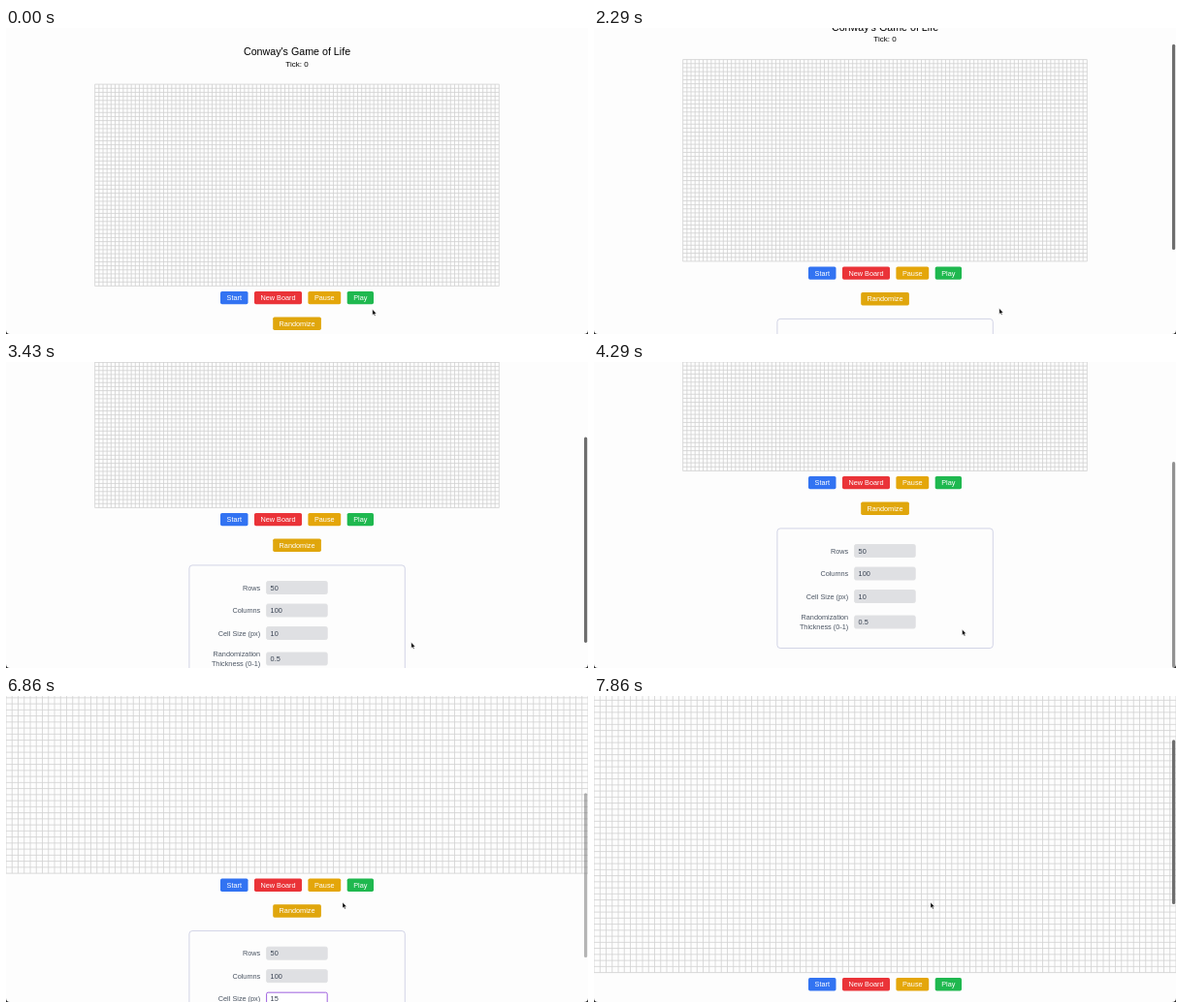
Animation of 600 by 316 pixels, one loop 8000 ms. Source, as an HTML page:

```html
<!DOCTYPE html>
<html lang="en">
<head>
<meta charset="utf-8">
<title>Game of Life board</title>
<style>
  html, body { margin: 0; width: 100%; height: 100%; overflow: hidden; background: #fdfdfd; }
  svg { display: block; width: 600px; height: 316px; }
  text { font: 7.3px "Liberation Sans", Arial, sans-serif; fill: #4b5563; }
  .mid { text-anchor: middle; }
  .end { text-anchor: end; }
  .head { fill: #000; }
  .light { fill: #fff; }
</style>
</head>
<body>
<svg viewBox="0 0 600 316">
  <g id="page">
    <text class="mid head" x="300" y="28" style="font-size:10.7px">Conway's Game of Life</text>
    <text class="mid head" x="300" y="39.7" style="font-size:8px">Tick: 0</text>
    <path id="grid" fill="none" stroke="#d3d3d3" stroke-width=".83"/>
    <g id="controls">
      <rect x="188.9" y="325.9" width="222.4" height="123.6" rx="3.2" fill="none" stroke="#cdd0e4" stroke-width=".9"/>
    </g>
  </g>
  <rect id="bar" x="596" width="3.2" rx="1.6" fill="#6e6e6e"/>
  <path d="M0 312Q0 316 4 316H0ZM600 312Q600 316 596 316H600Z" fill="#222"/>
  <g id="pointer">
    <path id="arrow" d="M0 0V5.8L1.3 4.6L2.2 6.7L3.2 6.3L2.3 4.3H4.1Z" fill="#000" stroke="#fff" stroke-width=".4"/>
    <path id="beam" d="M-1.3 -3.3Q0 -3.3 0 -2.4Q0 -3.3 1.3 -3.3M0 -2.4V2.4M-1.3 3.3Q0 3.3 0 2.4Q0 3.3 1.3 3.3M-.8 .9H.8" fill="none" stroke="#222" stroke-width=".7"/>
  </g>
</svg>
<script>
const $ = id => document.getElementById(id);
const SVG = "http://www.w3.org/2000/svg";
const FPS = 7, LOOP = 8000, STAGE = 316, SCALE = 600 / 1440;
const BOARD_TOP = 58.1, ROWS = 50, COLUMNS = 100;

function add(tag, attrs, text = "") {
  const node = document.createElementNS(SVG, tag);
  for (const name in attrs) node.setAttribute(name, attrs[name]);
  node.textContent = text;
  return $("controls").appendChild(node);
}

function button(label, x, y, width, fill) {
  add("rect", { x, y, width, height: 13.4, rx: 1.7, fill });
  add("text", { class: "mid light", x: x + width / 2, y: y + 9.2 }, label);
}

function field(lines, value, y) {
  lines.forEach((line, i) =>
    add("text", { class: "end", x: 262.2, y: y + 2.5 + (i - (lines.length - 1) / 2) * 9.7 }, line));
  const box = add("rect", { x: 268.6, y: y - 6.5, width: 62.6, height: 13, rx: 1.5, fill: "#dfe0e3", stroke: "#dfe0e3", "stroke-width": .9 });
  const text = add("text", { x: 272.6, y: y + 2.5, style: "fill:#374151" }, value);
  return { box, text };
}

button("Start", 221, 271.9, 28.5, "#3273f2");
button("New Board", 256, 271.9, 49, "#ea3338");
button("Pause", 311.4, 271.9, 33.8, "#e4a60a");
button("Play", 351.7, 271.9, 27.3, "#1fb84f");
button("Randomize", 275.2, 298.6, 49.7, "#e0a60c");
field(["Rows"], "50", 349);
field(["Columns"], "100", 372.5);
const size = field(["Cell Size (px)"], "10", 396);
field(["Randomization", "Thickness (0-1)"], "0.5", 422.5);

function gridPath(cell) {
  const width = COLUMNS * cell, height = ROWS * cell, left = (600 - width) / 2;
  let d = "";
  for (let c = 0; c <= COLUMNS; c++) d += `M${left + c * cell} ${BOARD_TOP}v${height}`;
  for (let r = 0; r <= ROWS; r++) d += `M${left} ${BOARD_TOP + r * cell}h${width}`;
  return d;
}
const grids = { small: gridPath(10 * SCALE), large: gridPath(15 * SCALE) };

// Keys are [tick, value]; values are interpolated linearly.
function track(keys, tick) {
  const next = keys.findIndex(key => key[0] > tick);
  if (next < 0) return keys[keys.length - 1][1];
  if (next === 0) return keys[0][1];
  const [t0, a] = keys[next - 1], [t1, b] = keys[next];
  return a + (b - a) * (tick - t0) / (t1 - t0);
}

const GROW = 44;
const scrollKeys = [[9, 0], [12, 10], [16, 25.5], [24, 116], [27, 154], [GROW - 1, 154], [GROW, 258], [48, 187.5], [55, 85]];
const pointerX = [[0, 377.8], [4, 417.8], [28, 417.8], [35, 284], [GROW, 284], [46, 347]];
const pointerY = [[0, 290.6], [4, 289.6], [28, 289.6], [35, 243], [GROW, 243], [46, 213.2]];
const barAlpha = [[9, 0], [10, 1], [29, 1], [33, 0], [GROW, 0], [48, .5], [50, 1]];

function draw(tick) {
  const large = tick >= GROW, focused = tick >= 37;
  const scroll = track(scrollKeys, tick);
  $("page").setAttribute("transform", `translate(0 ${-scroll})`);
  $("grid").setAttribute("d", large ? grids.large : grids.small);
  $("controls").setAttribute("transform", `translate(0 ${large ? ROWS * 5 * SCALE : 0})`);

  size.box.setAttribute("fill", focused ? "#fff" : "#dfe0e3");
  size.box.setAttribute("stroke", focused ? "#9550dc" : "#dfe0e3");
  size.text.textContent = tick < 41 ? "10" : tick < 43 ? "1" : "15";

  const ratio = STAGE / (large ? 588 : 470);
  $("bar").setAttribute("y", scroll * ratio - .5);
  $("bar").setAttribute("height", STAGE * ratio);
  $("bar").setAttribute("opacity", track(barAlpha, tick));

  const x = track(pointerX, tick), y = track(pointerY, tick);
  const typing = tick >= 41 && tick < GROW;
  const overText = tick < GROW && x < 331 && y < 262;
  $("pointer").setAttribute("transform", `translate(${x} ${y})`);
  $("pointer").setAttribute("opacity", typing ? 0 : 1);
  $("arrow").setAttribute("opacity", overText ? 0 : 1);
  $("beam").setAttribute("opacity", overText ? 1 : 0);
}

let shown = -1;
function loop() {
  const tick = Math.floor(((performance.now() + 2) % LOOP) * FPS / 1000);
  if (tick !== shown) draw(shown = tick);
  requestAnimationFrame(loop);
}
loop();
</script>
</body>
</html>
```
